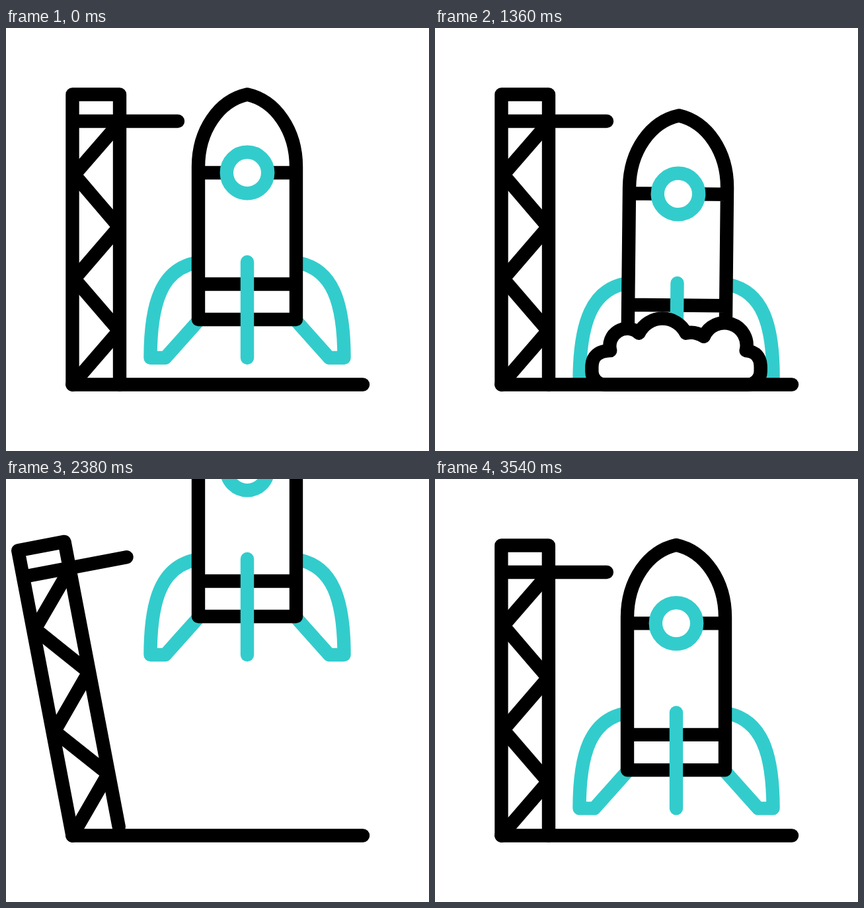
Recreate the animation shown at these times as an HTML page. Size 640x640 px, loop 3.6 s.

```html
<!DOCTYPE html>
<html lang="en">
<head>
<meta charset="utf-8">
<title>Rocket launch</title>
<style>
  html, body { margin: 0; width: 100%; height: 100%; overflow: hidden; background: #fff; }
  svg { display: block; width: 100%; height: 100%; }
  .line { fill: none; stroke: #000; stroke-width: 20.4; stroke-linecap: round; stroke-linejoin: round; }
  .teal { stroke: #33cccc; }
  .white { fill: #fff; }
</style>
</head>
<body>
<svg viewBox="0 0 640 640">
  <g id="rocket" class="line">
    <g class="teal">
      <path id="fin" d="M286 355.500C237 366 218.500 413 218.500 499H241L291 443"/>
      <use href="#fin" transform="translate(730) scale(-1 1)"/>
    </g>
    <path d="M291 441V210C291 155 322 110 365 100.500C408 110 439 155 439 210V441ZM291 219H439M291 387.500H439"/>
    <circle class="teal white" cx="365" cy="219" r="31.200"/>
    <path class="teal" d="M365 354V499"/>
  </g>
  <g id="tower" class="line">
    <path d="M100.500 539.500V100.500H172V539.500M100.500 141H260"/>
    <path d="M172 143L103.400 222L171 301L103.400 379.500L171 458L100.500 539.500"/>
  </g>
  <!-- Origin at the middle of the cloud's base -->
  <path id="cloud" class="line white" d="M-147 0A27 27 0 0 1 -174 -27V-36Q-174 -69 -136 -70
    A36 36 0 0 1 -77 -106A54 54 0 0 1 20 -106Q38 -111 57 -99
    A46 46 0 0 1 144 -70Q174 -67 174 -36V-27A27 27 0 0 1 147 0Z"/>
  <path class="line" d="M100.500 539.500H540"/>
</svg>
<script>
const LOOP = 3600, LAUNCH = 2000, APEX = 2790;
const [rocket, tower, cloud] = ['rocket', 'tower', 'cloud'].map(id => document.getElementById(id));

// Progress from 0 to 1 between two times, linear or eased at both ends
const linear = (t, from, to) => Math.min(1, Math.max(0, (t - from) / (to - from)));
const ease = (t, from, to) => (1 - Math.cos(Math.PI * linear(t, from, to))) / 2;

// The rocket sinks, takes off and, once out of sight, comes back down
function rocketY(t) {
  if (t > APEX) return 596 * (ease(t, 2640, 3560) - 1);
  return 32 * ease(t, 0, 400) - 606 * ease(t, 1990, 2840);
}

function draw(t) {
  const tilt = 0.85 * Math.sin(Math.PI * linear(t, 0, LAUNCH)) ** 2;
  const lean = 10.8 * (ease(t, 3200, 3550) - ease(t, 1600, LAUNCH));
  const scale = 0.31 + 1.05 * linear(t, 400, 2160) ** 1.5;

  rocket.setAttribute('transform', `translate(0 ${rocketY(t)}) rotate(${tilt} 365 499)`);
  tower.setAttribute('transform', `rotate(${lean} 100.5 539.5)`);
  cloud.setAttribute('transform', `translate(365 539.5) scale(${scale})`);
  cloud.style.strokeWidth = 20.4 / scale;
  cloud.style.opacity = ease(t, 430, 660) - ease(t, 1920, 2140);
}

const start = performance.now();
function tick() {
  draw((performance.now() - start) % LOOP);
  requestAnimationFrame(tick);
}
tick();
</script>
</body>
</html>
```
